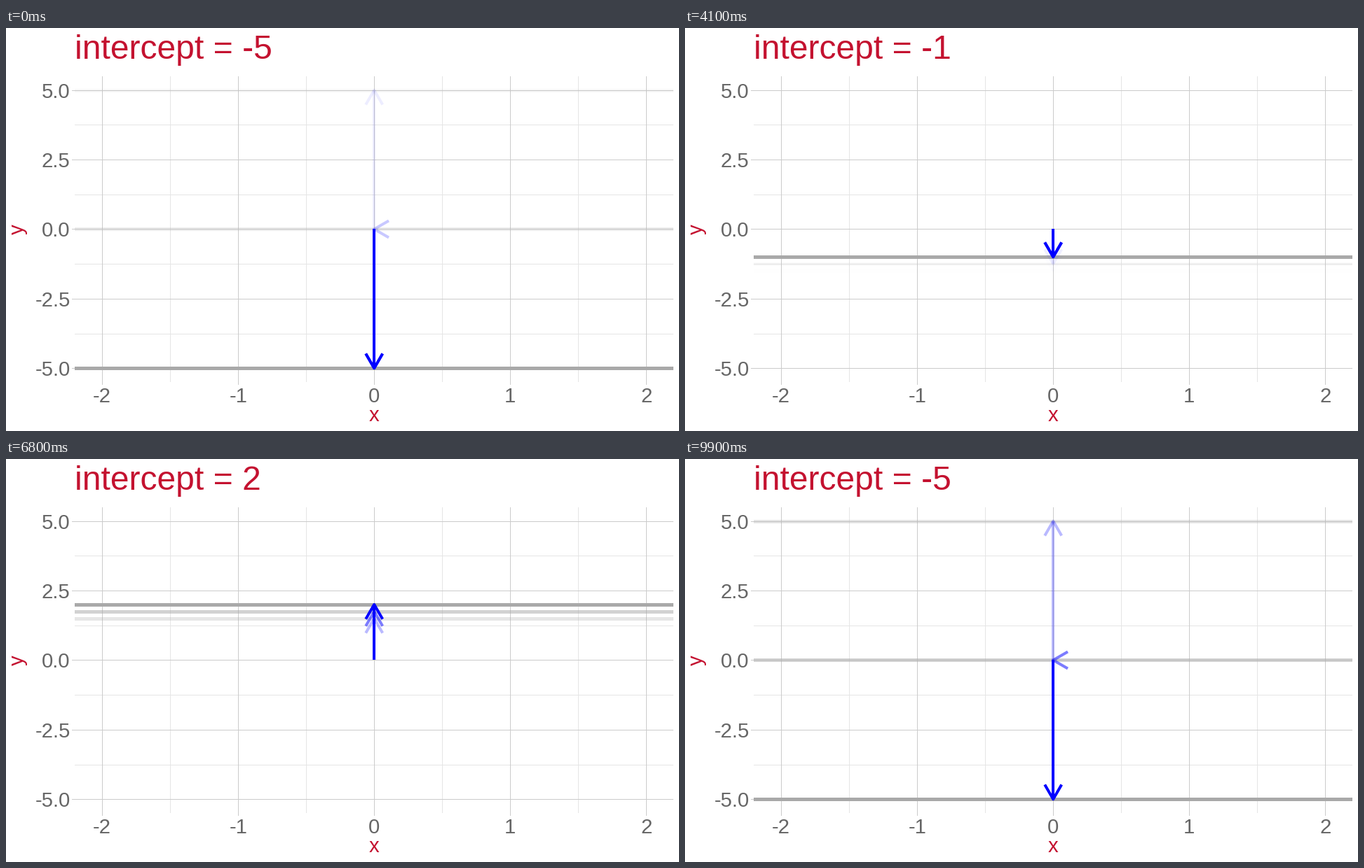
Recreate the animation shown at these times as a matplotlib script. Size 960 px wide and 576 px high, loop 10000 ms.

```python
import matplotlib.pyplot as plt
from matplotlib.animation import FuncAnimation
from matplotlib.patches import Rectangle

W, H, DPI = 960, 576, 100
FRAMES = 100
LEFT, RIGHT, TOP, BOTTOM = 98, 952, 69, 506
X0, Y0 = 525.2, 287.49          # pixel position of the data point (0, 0)
SX, SY = 194, 39.75             # pixels per data unit
WAKE = 5
RED, GREY, BLUE = "#c41230", "#a9a9a9", "#0000ff"
MAJOR, MINOR, TICK_TEXT = "#cbcbcb", "#e5e5e5", "#666666"
TICK = 4

plt.rcParams["font.family"] = "Liberation Sans"
fig = plt.figure(figsize=(W / DPI, H / DPI), dpi=DPI, facecolor="white")
ax = fig.add_axes([0, 0, 1, 1])
ax.set(xlim=(0, W), ylim=(H, 0))
ax.axis("off")


def px(size):
    return size * 72 / DPI


def to_x(v):
    return X0 + SX * v


def to_y(v):
    return Y0 - SY * v


def rect(x, y, w, h, color, z):
    box = Rectangle((x, y), w, h, facecolor=color, linewidth=0,
                    antialiased=False, zorder=z)
    return ax.add_patch(box)


def label(x, y, text, size, color, ha, **kw):
    return ax.text(x, y, text, fontsize=px(size), color=color,
                   ha=ha, va="baseline", zorder=9, **kw)


def draw_grid():
    for i in range(4):
        rect(round(to_x(i - 1.5)), TOP, 1, BOTTOM - TOP, MINOR, 1)
        y = round(to_y(3.75 - 2.5 * i))
        rect(LEFT, y, RIGHT - LEFT, 1, MINOR, 1)
    for i in range(5):
        v = i - 2
        rect(round(to_x(v)), TOP, 1, BOTTOM - TOP + TICK, MAJOR, 2)
        label(to_x(v), 535, str(v), 29.33, TICK_TEXT, "center")
        v = 2.5 * (i - 2)
        rect(LEFT - TICK, round(to_y(v)), RIGHT - LEFT + TICK, 1, MAJOR, 2)
        label(91.7, to_y(v) + 11, f"{v:.1f}", 29.33, TICK_TEXT, "right")
    label(X0, 562, "x", 29.33, RED, "center")
    ax.text(25, Y0, "y", fontsize=px(29.33), color=RED, rotation=90,
            rotation_mode="anchor", ha="center", va="baseline")


def build_timeline():
    """Intercept and title value per frame: hold, half-way step, next state."""
    states = [-5 + 0.5 * i for i in range(21)]
    path = [(states[0], states[0])]
    for i, a in enumerate(states):
        b = states[(i + 1) % len(states)]
        hold = 2 if i in (2, 9) or i >= 17 else 3
        path += [(a, a)] * hold + [((a + b) / 2, b), (b, b)]
    return path[:FRAMES]


class Pose:
    """One horizontal line with its arrow, at a fixed wake opacity."""

    def __init__(self, lag):
        alpha = (1 - lag / WAKE) ** 3
        z = 1 - lag / 10
        self.line = rect(LEFT, 0, RIGHT - LEFT, 5, GREY, 3 + z)
        self.shaft = rect(523, 0, 4, 0, BLUE, 5 + z)
        self.head, = ax.plot([], [], color=BLUE, linewidth=px(4),
                             solid_capstyle="butt", solid_joinstyle="round",
                             zorder=5.01 + z)
        for part in (self.line, self.shaft, self.head):
            part.set_alpha(alpha)

    def move(self, v):
        y = to_y(v)
        self.line.set_y(round(y) - 2)
        top, bottom = sorted((round(y), round(Y0)))
        self.shaft.set_y(top)
        self.shaft.set_height(bottom - top)
        self.shaft.set_visible(v != 0)
        if v == 0:
            self.head.set_data([X0 + 20.8, X0, X0 + 20.8], [y - 12, y, y + 12])
        else:
            back = y + (20.8 if v > 0 else -20.8)
            self.head.set_data([X0 - 12, X0, X0 + 12], [back, y, back])


draw_grid()
title = label(97.5, 44, "", 48, RED, "left")
poses = [Pose(lag) for lag in range(WAKE)]
timeline = build_timeline()


def update(frame):
    for lag, pose in enumerate(poses):
        pose.move(timeline[(frame - lag) % FRAMES][0])
    title.set_text(f"intercept = {timeline[frame][1]:g}")
    return []


anim = FuncAnimation(fig, update, frames=FRAMES, interval=100,
                     init_func=lambda: update(0), repeat=True,
                     repeat_delay=0, blit=False)
plt.show()
```
